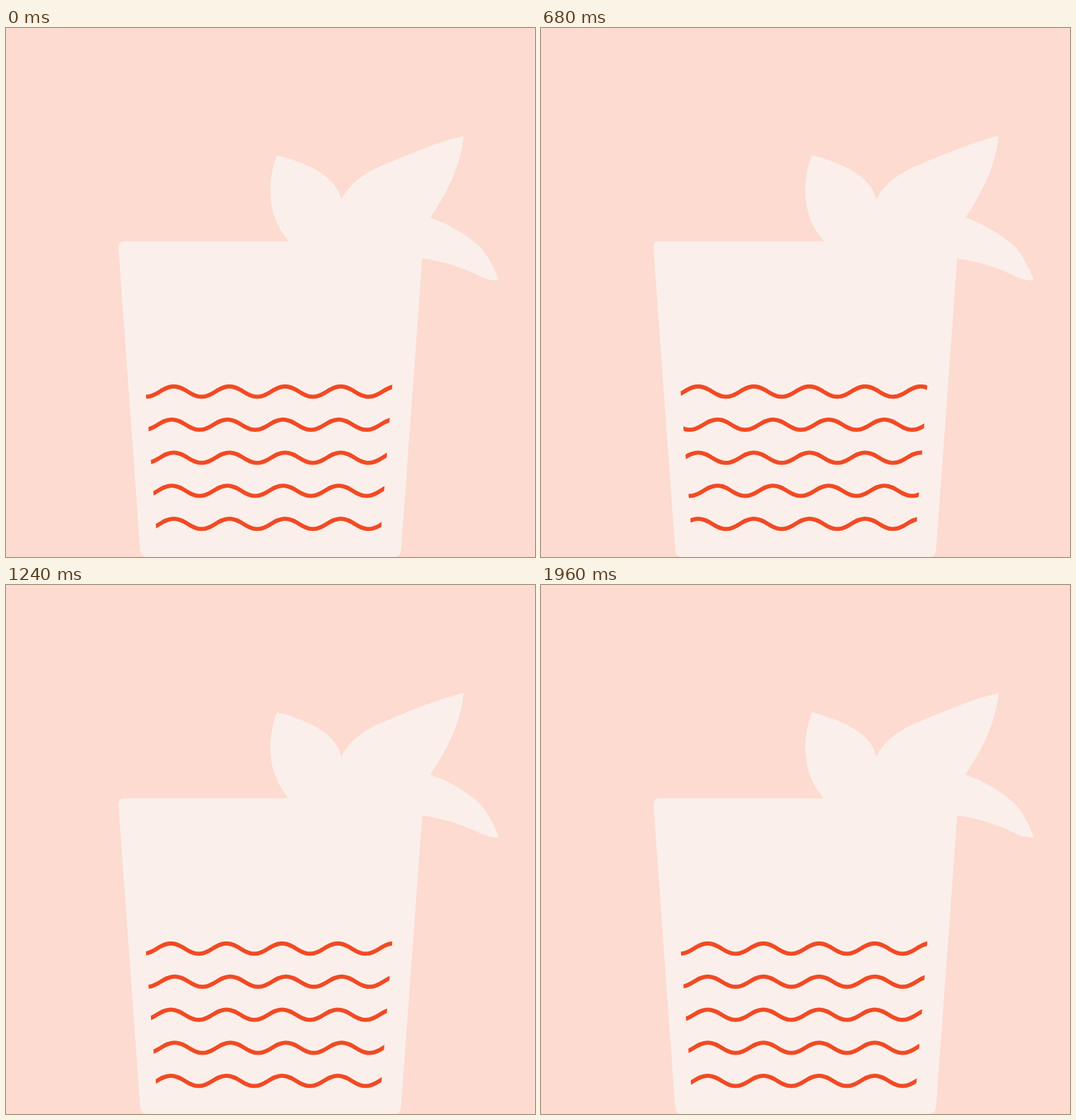
An HTML page that plays this animation: 748 px wide and 748 px high, repeating every 2000 ms.

```html
<!DOCTYPE html>
<html lang="en">
<head>
<meta charset="utf-8">
<title>Drink</title>
<style>
  html, body { margin: 0; width: 100%; height: 100%; overflow: hidden; background: #fddbd0; }
  svg { display: block; width: 100%; height: 100%; }
</style>
</head>
<body>
<svg viewBox="0 0 748 748">
  <clipPath id="drink"><path d="M196.7 504H546.3L530.2 712H212.6Z"/></clipPath>
  <path fill="#faefea" d="M159 311Q158.4 301.5 168 301.5H400
    C371 270 367 223 383 180C420 189 468 208 474 243
    C483 224 500 209 526 197C566 180 608 162 647 152.5
    C643 196 623 234 600 268C626 277 651 292 670 309
    C681 321 690 339 696 354Q697 357 693 357
    C684 357 673 353 664 348C640 337 614 329 588.5 326
    L558.6 738Q557.8 748 548 748H200Q190.5 748 189.7 738Z"/>
  <g id="waves" clip-path="url(#drink)" fill="none" stroke="#f14a24" stroke-width="5.8"></g>
</svg>
<script>
  const LOOP = 2000, STEP = 40;
  const LENGTH = 78.7, HEIGHT = 14.6, SPEED = 17.638;
  const waves = document.getElementById("waves");

  // Crest-to-trough curves, wide enough to cover every shift
  const half = LENGTH / 2, pull = half * 0.41;
  let curve = `M0 ${-HEIGHT / 2}`;
  for (let i = 0; i < 14; i++) {
    const h = i % 2 ? -HEIGHT : HEIGHT;
    curve += `c${pull} 0 ${half - pull} ${h} ${half} ${h}`;
  }

  const rows = Array.from({ length: 5 }, (_, i) => {
    const path = document.createElementNS("http://www.w3.org/2000/svg", "path");
    path.setAttribute("d", curve);
    waves.append(path);
    const odd = i % 2;
    return { path, y: 514.1 + i * 46.75, start: odd ? 234.4 : 237.2, dir: odd ? -1 : 1 };
  });

  const wrap = x => ((x % LENGTH) + LENGTH) % LENGTH;

  function draw(time) {
    const step = Math.floor((time % LOOP) / STEP);
    for (const { path, y, start, dir } of rows) {
      const x = 60 + wrap(start - 60 + dir * SPEED * step);
      path.setAttribute("transform", `translate(${x.toFixed(2)} ${y})`);
    }
  }

  const begin = performance.now();
  function tick() {
    draw(performance.now() - begin);
    requestAnimationFrame(tick);
  }
  tick();
</script>
</body>
</html>
```
